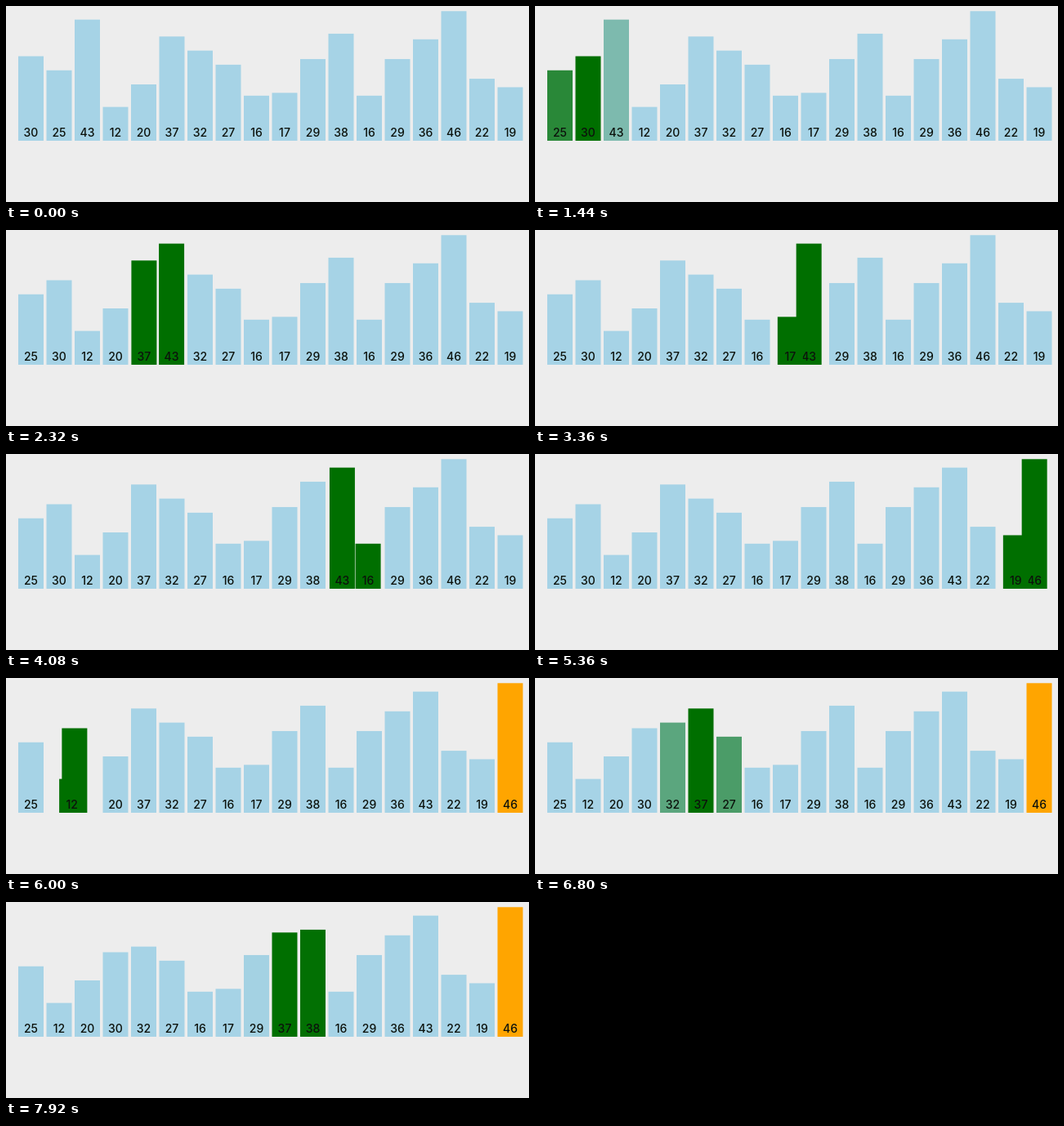
An HTML page that plays this animation: 640x240 px, repeating every 8 s.

```html
<!DOCTYPE html>
<html>
<head>
<meta charset="utf-8">
<style>
  html, body { margin: 0; width: 100%; height: 100%; overflow: hidden; background: #ededed; }
  svg { display: block; }
  text { font: 500 14px Inter, "Liberation Sans", sans-serif; text-anchor: middle; fill: #0c120c; }
</style>
</head>
<body>
<svg width="640" height="240"></svg>
<script>
const LOOP = 8000, START = 997, STEP = 400 / 3;
const IDLE = [166, 211, 230], ACTIVE = [0, 111, 0], SORTED = [255, 165, 0];
const values = [30, 25, 43, 12, 20, 37, 32, 27, 16, 17, 29, 38, 16, 29, 36, 46, 22, 19];
const svg = document.querySelector('svg');

function add(parent, tag, attrs) {
  const node = document.createElementNS('http://www.w3.org/2000/svg', tag);
  for (const key in attrs) node.setAttribute(key, attrs[key]);
  return parent.appendChild(node);
}

const bars = values.map(value => {
  const group = add(svg, 'g', {});
  const height = value * 3.45;
  const rect = add(group, 'rect', { y: 165 - height, width: 31, height });
  add(group, 'text', { x: 15.5, y: 160 }).textContent = value;
  return { group, rect };
});

// Bubble sort recorded as snapshots; every step tweens one snapshot into the next.
function record() {
  const order = values.map((_, i) => i);
  const colors = values.map(() => IDLE);
  const snapshots = [];
  const snap = () => snapshots.push(values.map((_, id) => ({ slot: order.indexOf(id), color: colors[id] })));
  const paint = (slot, color) => { colors[order[slot]] = color; };

  snap();
  for (let last = values.length - 1; last > 0; last--) {
    paint(0, ACTIVE);
    snap();
    for (let j = 0; j < last; j++) {
      if (j) paint(j - 1, IDLE);
      paint(j + 1, ACTIVE);
      snap();
      if (values[order[j]] > values[order[j + 1]]) {
        [order[j], order[j + 1]] = [order[j + 1], order[j]];
        snap();
      }
    }
    paint(last - 1, IDLE);
    paint(last, SORTED);
    snap();
  }
  return snapshots;
}

const snapshots = record();
const mix = (a, b, p) => a + (b - a) * p;

function draw() {
  const time = Math.max(0, (performance.now() % LOOP - START) / STEP);
  const index = Math.floor(time);
  const p = (1 - Math.cos(Math.PI * (time - index))) / 2;
  bars.forEach(({ group, rect }, id) => {
    const from = snapshots[index][id], to = snapshots[index + 1][id];
    group.setAttribute('transform', `translate(${15 + 34.5 * mix(from.slot, to.slot, p)} 0)`);
    rect.setAttribute('fill', `rgb(${from.color.map((c, i) => Math.round(mix(c, to.color[i], p)))})`);
  });
  requestAnimationFrame(draw);
}
draw();
</script>
</body>
</html>
```
